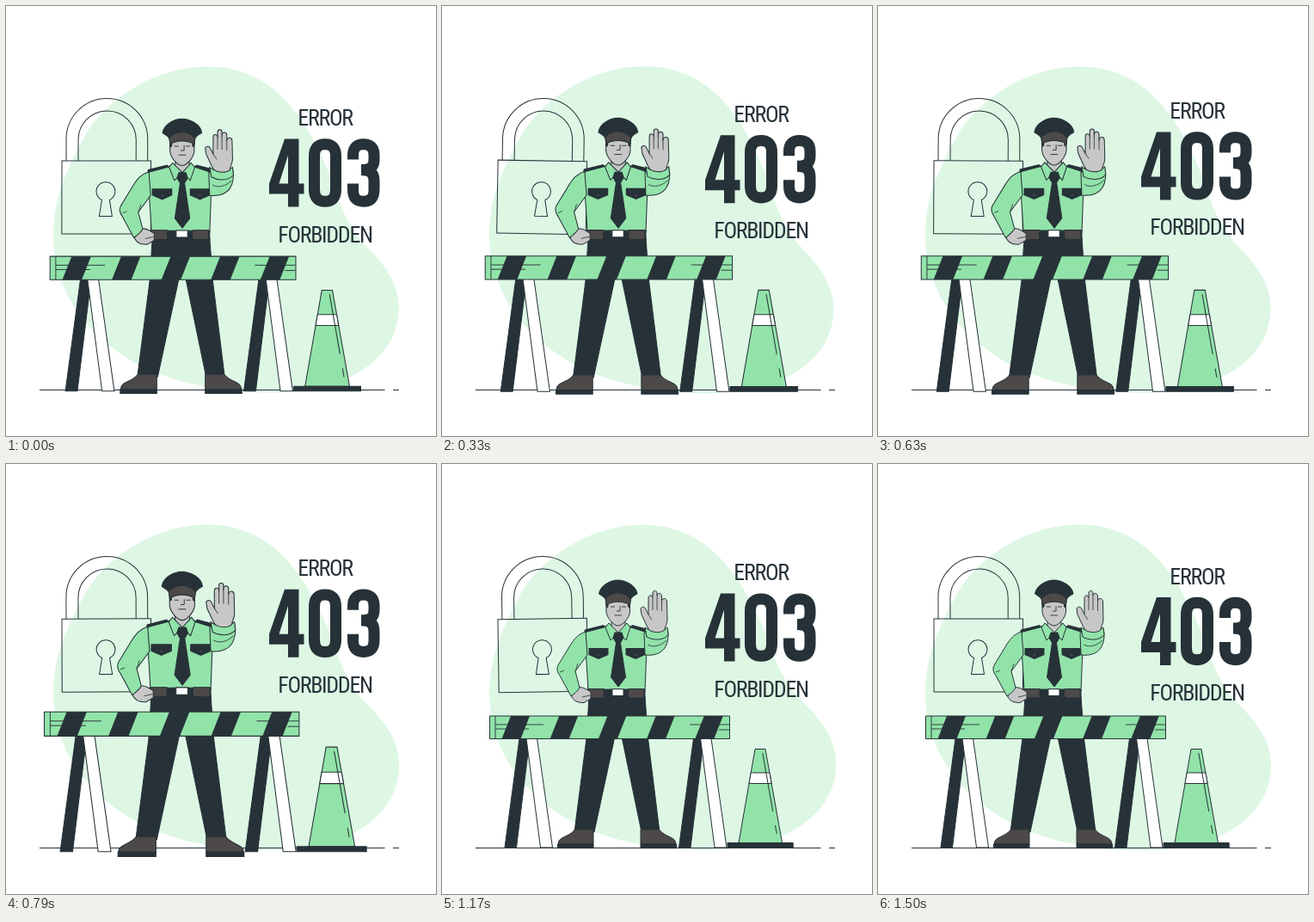
Write an HTML page with a canvas that moves like this. It is 500 px wide and 500 px high and loops after 1.54 s.

```html
<!DOCTYPE html>
<html lang="en">
<head>
<meta charset="utf-8">
<title>Error 403</title>
<style>
html, body { margin: 0; width: 100%; height: 100%; overflow: hidden; background: #fff; }
canvas { display: block; width: 100vw; height: 100vh; }
</style>
</head>
<body>
<canvas width="500" height="500" aria-label="Error 403 forbidden"></canvas>
<script>
const canvas = document.querySelector('canvas');
const ctx = canvas.getContext('2d');
const LOOP = 1540, STEPS = 37;
const INK = '#263238', GREEN = '#92e3a9', PALE = '#def7e5', SKIN = '#c7c7c7', BROWN = '#4d4949', WHITE = '#fff';

// Keyframes as [phase, value], linear between neighbours
const PULSE = [[0, 1], [.1, 1.1], [.3, 1], [.4, 1], [.5, 1.1], [.6, 1], [1, 1]];
const SWAY = [[0, 0], [.25, 1], [.75, -1], [1, 0]];
const FLOAT = [[0, 0], [.5, -10], [1, 0]];

function valueAt(keys, phase) {
  const i = keys.findIndex(([p]) => p >= phase);
  if (i < 1) return keys[0][1];
  const [p0, v0] = keys[i - 1], [p1, v1] = keys[i];
  return v0 + (v1 - v0) * (phase - p0) / (p1 - p0);
}

function shape(d, fill, stroke = INK, width = 1) {
  const path = new Path2D(d);
  if (fill) {
    ctx.fillStyle = fill;
    ctx.fill(path, 'evenodd');
  }
  if (stroke) {
    ctx.strokeStyle = stroke;
    ctx.lineWidth = width;
    ctx.stroke(path);
  }
}
const line = (d, width) => shape(d, null, INK, width);
const solid = (d, fill = INK) => shape(d, fill, null);

function around(x, y, { scale = 1, degrees = 0 }, draw) {
  ctx.save();
  ctx.translate(x, y);
  ctx.rotate(degrees * Math.PI / 180);
  ctx.scale(scale, scale);
  ctx.translate(-x, -y);
  draw();
  ctx.restore();
}

function blob() {
  solid('M235 70.5C170 70 113 112 90 154C72 188 55 222 55 266C55 330 92 382 150 415' +
    'C190 437 245 449.5 310 449.5C400 449 457 408 457 350C457 322 440 300 420 280' +
    'C395 255 386 225 374 190C353 143 318 70.5 235 70.5Z', PALE);
}

function padlock() {
  line('M65 180H168.5V265H65Z');
  line('M70 180V154.8A47.3 47.3 0 0 1 164.7 154.8V180M84 180V155.5A33.6 33.6 0 0 1 151.2 155.5V180');
  line('M111.5 225.5A10.9 10.9 0 1 1 120.5 225.5L123.5 244.5H108.5Z');
}

function lettering(dy) {
  ctx.save();
  ctx.translate(0, dy);
  ctx.font = 'extra-condensed 26px "Roboto Condensed", Roboto, "Open Sans", sans-serif';
  ctx.letterSpacing = '-1.3px';
  ctx.textAlign = 'center';
  ctx.fillStyle = INK;
  ctx.fillText('ERROR', 371, 139.7);
  ctx.fillText('FORBIDDEN', 371, 275);
  solid('M324 155H340.5V207H346.5V219H340.5V234H328V219H306V207ZM317.5 207H328V174Z');
  line('M358.5 175C358.5 165.5 363 161.3 371 161.3S383.5 165.5 383.5 175V214' +
    'C383.5 223.5 379 227.7 371 227.7S358.5 223.5 358.5 214Z', 13);
  line('M403.5 179V174C403.5 165 408 161.3 415.7 161.3S428 165 428 174V179' +
    'C428 188 423.5 191 413 191C423.5 191 428 195 428 204V214' +
    'C428 224 423.5 227.7 415.7 227.7S403.5 224 403.5 214V207', 13);
  ctx.restore();
}

function trousers() {
  shape('M171 270H236L239.5 319L253 428H232L206.5 305H203.5L177 428H154L168 319Z', INK);
}

function shoe() {
  shape('M154.5 425H176V442H135C135 433 148 434 154.5 425Z', BROWN);
  shape('M134.5 442H176V446.7H134.5Z', INK);
}

function shoes() {
  shoe();
  ctx.save();
  ctx.translate(407, 0);
  ctx.scale(-1, 1);
  shoe();
  ctx.restore();
}

function arms() {
  // Hand on hip
  shape('M151 266C154 259 161 258 168 262L173 265V273L165 277.5C158 278 153 275 151 271Z', SKIN);
  line('M172 269L163 271', .8);
  shape('M167 195C158 198 154 203 149 211L135 234C133 238 134 242 137 246L150 270' +
    'C154 267 158 264 160 260L155 241L169 222Z', GREEN);
  line('M155 241L158 232M137 242L142 240', .8);
  // Raised arm
  shape('M235 196L239 195C246 198 256 196 262 192C264 198 263 208 259 214' +
    'C254 221 246 223 236 222Z', GREEN);
  shape('M236 190C244 196 254 196 262 190L263 199C256 206 245 205 238 201Z', GREEN);
  line('M239 210C246 214 255 211 261 205', .8);
  shape('M238 188L232 175L231 168C233 165 236 166 237 169L240 175V156' +
    'C240 152 244 152 245 155V150C245 146.5 250 146.5 250 150V153' +
    'C251 149 255.5 150 255.5 154V159C257 155 261.5 156 261.5 160' +
    'L262 181C262 186 259 189 259 193C254 197 245 196 241 193Z', SKIN);
  line('M245 155V170M250 153V170M255.5 158V171M240 175L244 181', .8);
}

function torso() {
  shape('M193 188L167 195C166 212 169 240 170 264H236C237 240 238 215 238.5 196L216 188Z', GREEN);
  solid('M188 187L166 192.5L165 196.5L190 190ZM221 187L240 192L241 197L218 190Z');
  shape('M197 180H213V195L205 204L197 194Z', SKIN);
  shape('M194 185L190 190L196 205L205 196L214 205L219 190L215 185L205 196Z', GREEN);
  shape('M201 196H209L211 202L207.5 208L213.5 248L205 259L196.5 248L202.5 208L199 202Z', INK);
  for (const x of [170.5, 213.5]) {
    solid(`M${x} 214H${x + 23}V222L${x + 11.5} 227L${x} 222Z`);
    solid(`M${x + 10.5} 221h2v2h-2Z`, BROWN);
  }
  shape('M170 262H236V272H170Z', INK);
  for (const x of [169, 216]) shape(`M${x + 1} 261.5H${x + 19}V272H${x + 2}L${x} 269Z`, BROWN);
  shape('M198 261.7H211V269.5H198Z', WHITE);
}

function head() {
  shape('M191 156V172C192 180 200 188 204.7 188S217.5 180 218.5 172V156Z', SKIN);
  solid('M189.5 153H193.5V166L191 168ZM216 153H220L218.5 168L216 166Z');
  line('M196 166H201M209 166H214M207 165V171H203M200.5 176H209', .9);
  shape('M190 157C194 147.5 215 147.5 219.5 157L218.5 164C211 159 198 159 191.5 164Z', BROWN);
  shape('M182.5 151C184 141 196 135 204.5 135S226 141 227 151C223 153 221 155 219.5 157' +
    'C211 147.5 198 147.5 190 157C188 154 185 153 182.5 151Z', INK);
}

function guard() {
  trousers();
  shoes();
  torso();
  arms();
  head();
}

function barrier() {
  for (const x of [0, 202.5]) {
    shape(`M${x + 90} 319H${x + 102}L${x + 86.5} 446H${x + 73}Z`, INK);
    shape(`M${x + 98} 319H${x + 110.5}L${x + 128.5} 446H${x + 114.5}Z`, WHITE);
  }
  solid('M55.5 293H334.5V319.5H55.5Z', GREEN);
  line('M62 293V319.5M62 303H118M62 308H101M288 303H334M322 309H334', .9);
  for (let i = 0; i < 5; i++) solid(`M${80 + i * 56.2} 293h22l-10.5 26.5h-22Z`);
  line('M55.5 293H334.5V319.5H55.5Z');
}

function cone() {
  shape('M364 331.5H376L395.5 440.5H345Z', GREEN);
  shape('M359.2 359H380.9L383.1 371.5H357Z', WHITE);
  line('M372.8 336L384.7 404M387.5 420L389.2 430', 1);
  shape('M332 440.5H408.2V446H332Z', INK);
}

function render(now) {
  const step = Math.floor((now % LOOP + 6) * STEPS / LOOP);
  const phase = (step + .9) / STEPS % 1;
  const sway = { degrees: valueAt(SWAY, phase) };
  const pulse = { scale: valueAt(PULSE, phase) };

  ctx.fillStyle = WHITE;
  ctx.fillRect(0, 0, 500, 500);
  around(256, 260, sway, blob);
  line('M39 446.5H440.5M450 446.5H457');
  around(117, 186, sway, padlock);
  lettering(valueAt(FLOAT, phase));
  around(203, 291, pulse, guard);
  around(232, 369.7, pulse, () => {
    barrier();
    cone();
  });
}

const start = performance.now();
function tick() {
  render(performance.now() - start);
  requestAnimationFrame(tick);
}
tick();
</script>
</body>
</html>
```
